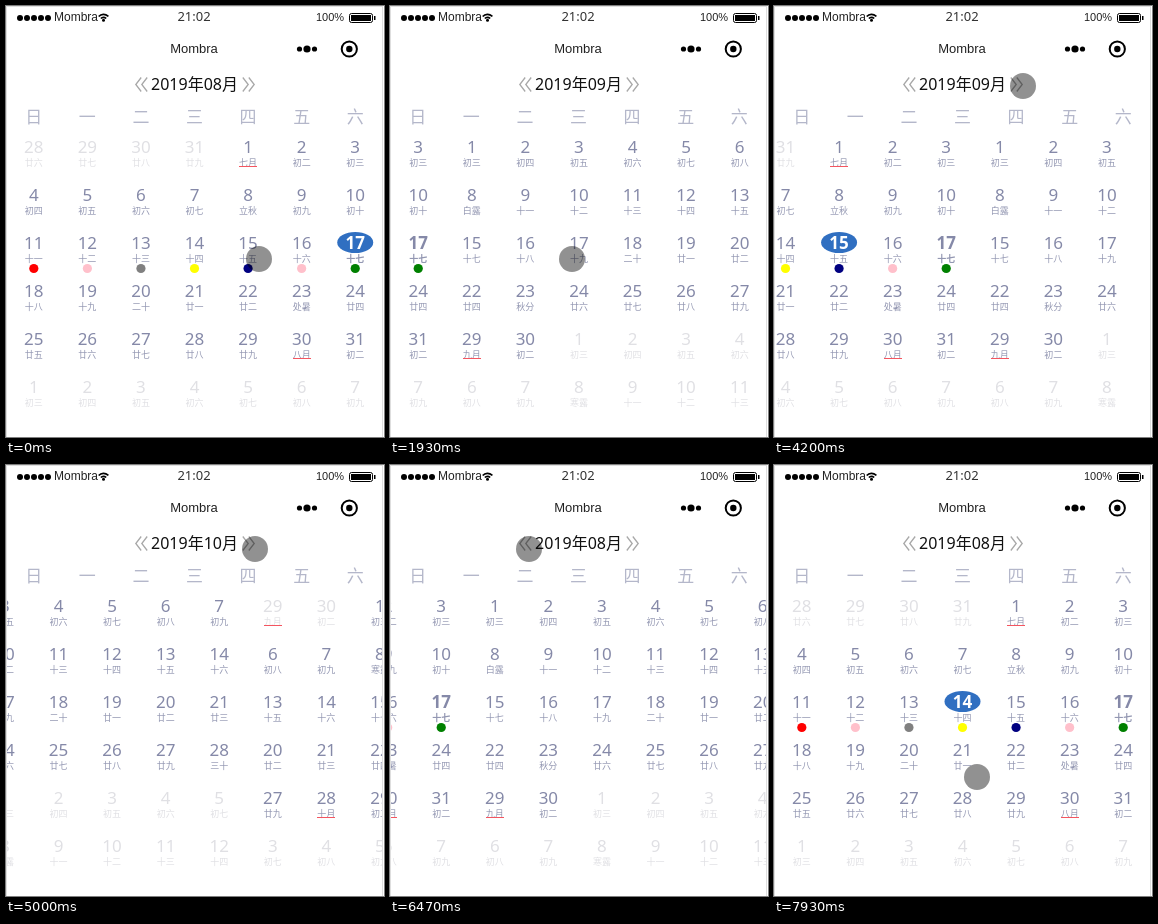
Animation, 378 px wide and 431 px high, one loop 8000 ms. Source, as an HTML page with a canvas:

```html
<!DOCTYPE html>
<html lang="zh-CN">
<head>
<meta charset="utf-8">
<title>Calendar</title>
<style>
html, body { margin: 0; width: 378px; height: 431px; overflow: hidden; background: #fff; }
canvas { display: block; }
</style>
</head>
<body>
<canvas id="stage" width="378" height="431"></canvas>
<script>
const ctx = document.getElementById('stage').getContext('2d');
const LOOP = 8000, STEP = 200 / 3, DAY = 864e5;
const PAGE = 375, COL = PAGE / 7, ROW = 48;
const SANS = '"Noto Sans", "Noto Sans CJK SC", "Noto Sans CJK", sans-serif';
const CJK = '"Noto Sans CJK SC", "Noto Sans CJK", sans-serif';
const ARIAL = '"Liberation Sans", Arial, sans-serif';
const APP = 'Mombra';

const utc = (month, day) => Date.UTC(2019, month - 1, day);

// First day of each lunar month
const lunarMonths = [
  [utc(7, 3), '六月'], [utc(8, 1), '七月'], [utc(8, 30), '八月'],
  [utc(9, 29), '九月'], [utc(10, 28), '十月']
];
const solarTerms = {
  '8-8': '立秋', '8-23': '处暑', '9-8': '白露',
  '9-23': '秋分', '10-8': '寒露', '10-24': '霜降'
};
const DIGITS = '一二三四五六七八九十';
const dotColors = { 11: 'red', 12: 'pink', 13: 'gray', 14: 'yellow', 15: 'navy', 16: 'pink', 17: 'green' };

function lunarDay(n) {
  if (n === 20) return '二十';
  if (n === 30) return '三十';
  return '初十廿'[n <= 10 ? 0 : n < 20 ? 1 : 2] + DIGITS[(n - 1) % 10];
}

function lunarLabel(time) {
  const [start, name] = lunarMonths.filter(m => m[0] <= time).pop();
  const n = (time - start) / DAY + 1;
  if (n === 1) return { label: name, first: true };
  const d = new Date(time);
  const term = solarTerms[`${d.getUTCMonth() + 1}-${d.getUTCDate()}`];
  return { label: term || lunarDay(n), first: false };
}

function buildMonth(month) {
  const first = utc(month, 1);
  const lead = new Date(first).getUTCDay();
  return Array.from({ length: 42 }, (_, i) => {
    const time = first + (i - lead) * DAY;
    const date = new Date(time);
    const inside = date.getUTCMonth() === month - 1;
    const august = inside && month === 8;
    const day = date.getUTCDate();
    return { day, inside, august, today: august && day === 17, ...lunarLabel(time) };
  });
}
const months = [8, 9, 10].map(buildMonth);

// Touch pointer: time, x, y
const pointerPath = [
  [0, 253, 253], [130, 249, 249], [530, 249, 249], [870, 305, 144], [1200, 343, 220],
  [1400, 350, 270], [1740, 182, 253], [1940, 182, 253], [2270, 151, 255], [2330, 132, 251],
  [2400, 132, 251], [2470, 128, 248], [2600, 128, 248], [2870, 372, 279], [3005, 372, 279],
  [3470, 239, 79], [3530, 253, 76], [3600, 253, 76], [3870, 249, 80], [4210, 249, 80],
  [4600, 249, 84], [5130, 249, 84], [5470, 139, 84], [6800, 139, 84], [7000, 152, 179],
  [7130, 178, 243], [7200, 178, 243], [7400, 201, 273], [7730, 201, 273], [7800, 204, 325],
  [7930, 203, 312]
];

// Pager: start, duration, from, to, eased
const slides = [
  [1400, 352, 0, 168, false], [1752, 500, 168, PAGE, true],
  [2600, 280, PAGE, 131, false], [2880, 500, 131, 0, true],
  [4104, 500, 0, PAGE, true], [4930, 500, PAGE, 2 * PAGE, true],
  [5749, 500, 2 * PAGE, PAGE, true], [6430, 500, PAGE, 0, true]
];
const titles = [[0, '08'], [1752, '09'], [2880, '08'], [4060, '09'], [4860, '10'], [5725, '09'], [6395, '08']];
const selections = [[0, 17], [325, 15], [7660, 14]];

const clamp01 = v => Math.max(0, Math.min(1, v));
const current = (list, t) => list.filter(e => e[0] <= t).pop();

function pointerAt(t) {
  const i = pointerPath.findIndex(p => p[0] > t);
  if (i < 0) return pointerPath[pointerPath.length - 1].slice(1);
  const [t0, x0, y0] = pointerPath[i - 1], [t1, x1, y1] = pointerPath[i];
  const p = (t - t0) / (t1 - t0);
  return [x0 + (x1 - x0) * p, y0 + (y1 - y0) * p];
}

function scrollAt(t) {
  const slide = current(slides, t);
  if (!slide) return 0;
  const [start, duration, from, to, eased] = slide;
  const p = clamp01((t - start) / duration);
  return from + (to - from) * (eased ? 1 - (1 - p) ** 3 : p);
}

function text(str, x, y, font, color, align = 'center') {
  ctx.font = font;
  ctx.fillStyle = color;
  ctx.textAlign = align;
  ctx.fillText(str, x, y);
}

function oval(x, y, rx, ry, color) {
  ctx.fillStyle = color;
  ctx.beginPath();
  ctx.ellipse(x, y, rx, ry, 0, 0, Math.PI * 2);
  ctx.fill();
}
const disc = (x, y, r, color) => oval(x, y, r, r, color);

function strokeArc(x, y, r, from, to, width) {
  ctx.strokeStyle = '#000';
  ctx.lineWidth = width;
  ctx.beginPath();
  ctx.arc(x, y, r, from, to);
  ctx.stroke();
}

function chevrons(x, dir) {
  ctx.strokeStyle = '#a8a8a8';
  ctx.lineWidth = 1.3;
  ctx.beginPath();
  for (const dx of [0, 6]) {
    ctx.moveTo(x + dx - 2.7 * dir, 71.5);
    ctx.lineTo(x + dx + 2.7 * dir, 78.5);
    ctx.lineTo(x + dx - 2.7 * dir, 85.5);
  }
  ctx.stroke();
}

function drawStatusBar() {
  for (let i = 0; i < 5; i++) disc(14 + i * 7, 12, 3, '#000');
  text(APP, 48, 15, `12px ${ARIAL}`, '#222', 'left');
  for (const r of [3.6, 6.6]) strokeArc(97.5, 15, r, -Math.PI * 0.76, -Math.PI * 0.24, 1.7);
  disc(97.5, 14.3, 1.5, '#000');
  text('21:02', 188, 15, `13px ${SANS}`, '#333');
  text('100%', 310, 15, `11px ${ARIAL}`, '#222', 'left');
  ctx.strokeStyle = ctx.fillStyle = '#000';
  ctx.lineWidth = 1;
  ctx.beginPath();
  ctx.roundRect(343.5, 7.5, 23, 9, 2);
  ctx.stroke();
  ctx.fillRect(345, 9, 20, 6);
  ctx.fillRect(368, 10, 1.5, 4);
}

function drawHeader(month) {
  text(APP, 188, 47, `13px ${ARIAL}`, '#222');
  disc(293.5, 43, 2.6, '#000');
  disc(301, 43, 3.6, '#000');
  disc(308.5, 43, 2.6, '#000');
  strokeArc(343.3, 43, 7.6, 0, Math.PI * 2, 2);
  disc(343.3, 43, 3.2, '#000');
  chevrons(132.5, -1);
  chevrons(239.5, 1);
  text(`2019年${month}月`, 188.5, 84, `16px ${SANS}`, '#111');
  [...'日一二三四五六'].forEach((name, i) =>
    text(name, 27.8 + i * COL, 117, `17px ${CJK}`, '#b4b7ca'));
}

function drawCell(cell, x, y, selected) {
  const picked = cell.august && cell.day === selected;
  if (picked) oval(x, y - 0.5, 18, 10.5, '#306fc1');
  const weight = cell.today || picked ? 'bold' : 500;
  const numberColor = picked ? '#fff' : cell.inside ? '#8589a8' : '#e0e0e4';
  text(cell.day, x, y + 6, `${weight} 17px ${SANS}`, numberColor);
  text(cell.label, x, y + 18.5, `${cell.today ? 'bold' : 'normal'} 9px ${CJK}`,
    cell.inside ? '#9397b2' : '#e0e0e4');
  if (cell.first) {
    ctx.fillStyle = '#f45560';
    ctx.fillRect(Math.round(x - 9), y + 19, 18, 1);
  }
  if (cell.august && dotColors[cell.day]) disc(x, y + 25.5, 4.6, dotColors[cell.day]);
}

function drawPages(scroll, selected) {
  ctx.save();
  ctx.beginPath();
  ctx.rect(1, 124, PAGE, 307);
  ctx.clip();
  months.forEach((cells, page) => {
    const left = Math.round(page * PAGE - scroll);
    if (Math.abs(left) >= PAGE) return;
    cells.forEach((cell, i) =>
      drawCell(cell, left + 27.8 + (i % 7) * COL, 141 + Math.floor(i / 7) * ROW, selected));
  });
  ctx.restore();
}

function draw(t) {
  ctx.fillStyle = '#fff';
  ctx.fillRect(0, 0, 378, 431);
  drawStatusBar();
  drawHeader(current(titles, t)[1]);
  drawPages(scrollAt(t), current(selections, t)[1]);
  ctx.fillStyle = '#dedede';
  ctx.fillRect(0, 0, 1, 431);
  ctx.fillRect(376, 0, 1, 431);
  ctx.fillRect(0, 0, 377, 1);
  disc(...pointerAt(t), 13, 'rgba(0, 0, 0, 0.43)');
}

const begin = performance.now();
function tick() {
  const t = (performance.now() - begin) % LOOP;
  draw(Math.floor((t + 4) / STEP) * STEP % LOOP);
  requestAnimationFrame(tick);
}
tick();
</script>
</body>
</html>
```
